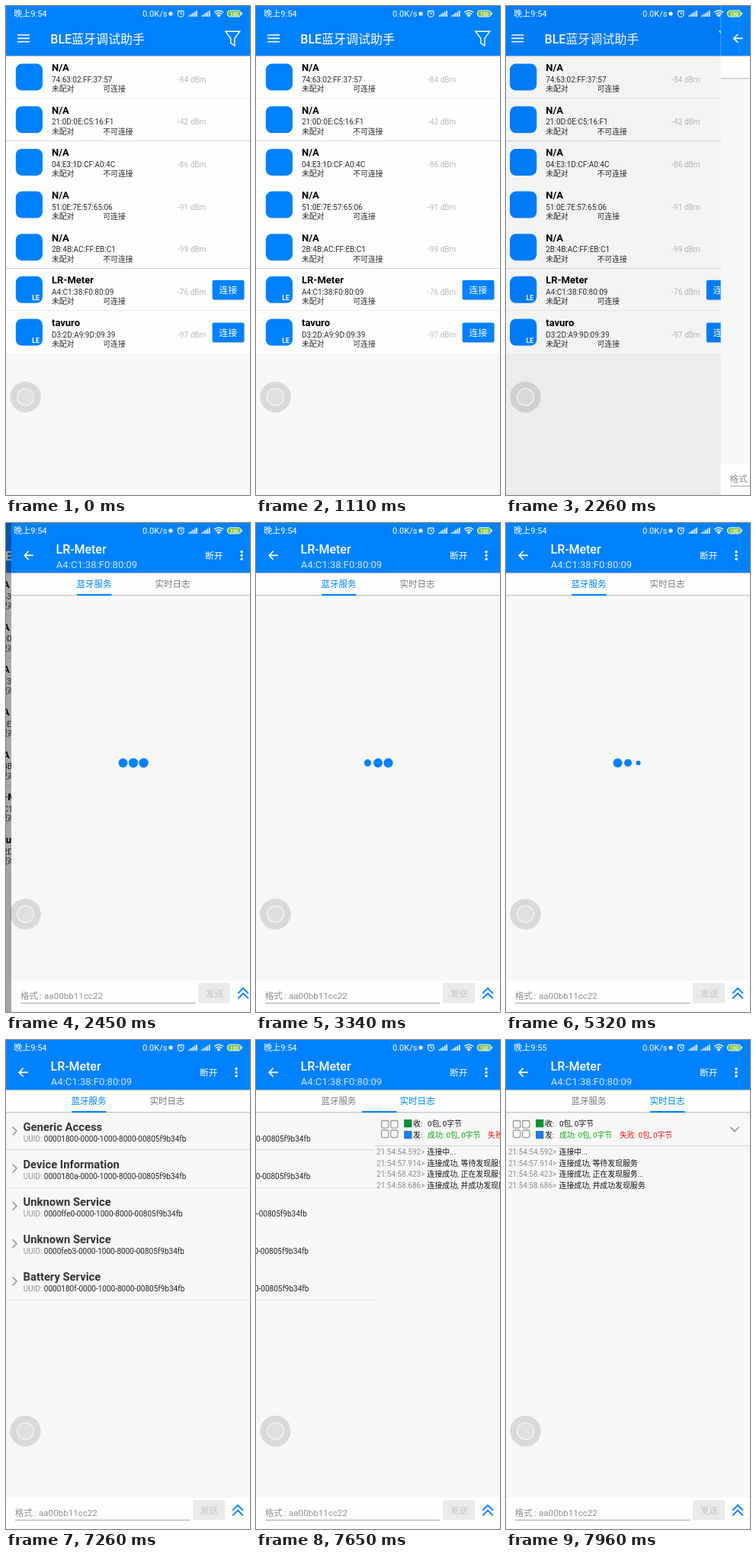
Write an HTML page that moves like this. It is 320x640 px and loops after 8000 ms.

```html
<!DOCTYPE html>
<html lang="zh-CN">
<head>
<meta charset="utf-8">
<title>BLE</title>
<style>
  html, body { margin: 0; width: 100%; height: 100%; overflow: hidden; background: #f6f8f6; }
  svg { display: block; width: 320px; height: 640px; }
  text { font-family: Roboto, "Noto Sans CJK SC", "Noto Sans CJK", sans-serif; white-space: pre; }
  .line { fill: none; stroke-linecap: butt; stroke-linejoin: miter; }
</style>
</head>
<body>
<svg id="stage" viewBox="0 0 320 640" xmlns="http://www.w3.org/2000/svg"></svg>
<script>
const BLUE = '#0081ff', PAPER = '#f6f8f6', WHITE = '#fdfffd';

const rect = (x, y, w, h, fill, extra = '') =>
  `<rect x="${x}" y="${y}" width="${w}" height="${h}" fill="${fill}" ${extra}/>`;
const circle = (x, y, r, fill, extra = '') =>
  `<circle cx="${x}" cy="${y}" r="${r}" fill="${fill}" ${extra}/>`;
const path = (d, stroke, width = 1.6, extra = '') =>
  `<path class="line" d="${d}" stroke="${stroke}" stroke-width="${width}" ${extra}/>`;
const text = (x, y, size, fill, str, weight = 400, extra = '') =>
  `<text x="${x}" y="${y}" font-size="${size}" fill="${fill}" font-weight="${weight}" ${extra}>${str}</text>`;
const group = (id, body, extra = '') => `<g id="${id}" ${extra}>${body}</g>`;
const shadow = y => rect(0, y, 320, 1, '#000', 'opacity=".2"') + rect(0, y + 1, 320, 1, '#000', 'opacity=".07"');

// Scan list
const devices = [
  ['N/A', '74:63:02:FF:37:57', 1, -84],
  ['N/A', '21:0D:0E:C5:16:F1', 0, -42],
  ['N/A', '04:E3:1D:CF:A0:4C', 0, -86],
  ['N/A', '51:0E:7E:57:65:06', 1, -91],
  ['N/A', '2B:4B:AC:FF:EB:C1', 0, -99],
  ['LR-Meter', 'A4:C1:38:F0:80:09', 1, -76, 'LE'],
  ['tavuro', 'D3:2D:A9:9D:09:39', 1, -97, 'LE'],
];
const deviceLines = [.06, .17, 0, 0, .17, .07, 0];

function deviceRow([name, mac, open, rssi, le], i) {
  const y = 65.6 + 55.65 * i;
  let out = rect(12.8, y + 10, 35.2, 35, BLUE, 'rx="8"')
    + text(60, y + 19.3, 13, '#000', name, 700)
    + text(60, y + 34.1, 10, '#2b2b2b', mac)
    + text(60, y + 46.5, 9.8, '#2b2b2b', '未配对')
    + text(127.3, y + 46.5, 9.8, '#2b2b2b', open ? '可连接' : '不可连接')
    + text(225, y + 34.1, 10.1, '#b9bbb9', rssi + ' dBm')
    + rect(0, Math.floor(y + 55), 320, 1, '#000', `opacity="${deviceLines[i]}"`);
  if (le) out += text(34.3, y + 41.5, 8.7, '#fff', le, 700)
    + rect(270.6, y + 16, 41.8, 25.4, '#000', 'rx="2" opacity=".18"')
    + rect(270.6, y + 14.9, 41.8, 25.5, BLUE, 'rx="2"')
    + text(279.6, y + 32, 11.8, '#fff', '连接');
  return out;
}

const scanPage = rect(0, 0, 320, 640, PAPER)
  + rect(0, 65, 320, 390, WHITE)
  + devices.map(deviceRow).join('')
  + circle(291.5, 371.5, 0, '#fff', 'id="ripple" clip-path="url(#button)"')
  + rect(0, 0, 320, 65, BLUE) + shadow(65)
  + path('M15 38H31M15 42.4H31M15 46.8H31', '#fff', 1.6)
  + text(58.3, 49, 16, '#fff', 'BLE蓝牙调试助手', 500)
  + path('M288 33.3H306.6L299.8 42.5V52L294.8 48.6V42.5Z', '#fff', 1.4);

// Device page
const services = [
  ['Generic Access', '1800'],
  ['Device Information', '180a'],
  ['Unknown Service', 'ffe0'],
  ['Unknown Service', 'feb3'],
  ['Battery Service', '180f'],
];
const serviceLines = [.14, .07, 0, .02, .06];

function serviceRow([name, id], i) {
  const y = 94.6 + 49.2 * i;
  return path(`M8.5 ${y + 18.8}L14 ${y + 24.3}L8.5 ${y + 29.8}`, '#8b8d8b', 1.4)
    + text(22.5, y + 24, 14.8, '#333', name, 700)
    + text(22.7, y + 38, 10, '#929492',
        `UUID: <tspan fill="#222">0000${id}-0000-1000-8000-00805f9b34fb</tspan>`)
    + rect(0, Math.round(y + 48.7), 320, 1, '#000', `opacity="${serviceLines[i]}"`);
}

const logs = [
  ['54.592', '连接中...'],
  ['57.914', '连接成功, 等待发现服务'],
  ['58.423', '连接成功, 正在发现服务...'],
  ['58.686', '连接成功, 并成功发现服务'],
];
const logRow = ([time, msg], i) =>
  text(3, 150 + 14.5 * i, 10, '#8b8d8b', `21:54:${time}&gt;`)
  + text(69.5, 150 + 14.5 * i, 9.9, '#111', msg);

const tiles = [[9.5, 105.5], [21.7, 105.5], [9.5, 118], [21.7, 118]]
  .map(([x, y]) => rect(x, y, 9.2, 9.6, 'none', 'rx="1.8" stroke="#999b99" stroke-width="1.3"')).join('');

const logPage = tiles
  + rect(39, 104, 10.3, 10.3, '#0a8f35') + rect(39, 119, 10.3, 10.3, '#1f7ce0')
  + text(51, 113, 9.8, '#111', '收:') + text(70, 113, 9.8, '#111', '0包, 0字节')
  + text(51, 127.8, 9.8, '#111', '发:')
  + text(70, 127.8, 9.8, '#10a010', '成功: 0包, 0字节')
  + text(149, 127.8, 9.8, '#dc1414', '失败: 0包, 0字节')
  + path('M294.3 114L299.9 119.6L305.5 114', '#8b8d8b', 1.5)
  + rect(0, 138, 320, 1, '#d3d5d3')
  + logs.map(logRow).join('');

const dotX = [146.5, 160, 173.5];

const devicePage = rect(0, 0, 320, 640, PAPER)
  + group('services', services.map(serviceRow).join(''))
  + group('log', logPage)
  + group('dots', dotX.map(x => circle(x, 314, 6.2, BLUE)).join(''))
  + rect(0, 65, 320, 29, WHITE) + shadow(94)
  + text(85.5, 84.3, 11.5, BLUE, '蓝牙服务', 400, 'id="tabA"')
  + text(188.5, 84.3, 11.5, '#777', '实时日志', 400, 'id="tabB"')
  + rect(86, 93, 45.5, 2, BLUE, 'id="mark"')
  + rect(0, 0, 320, 65, BLUE) + shadow(65)
  + path('M29 42.4H17.5M22.7 36.8L17.1 42.4L22.7 48', '#fff', 1.6)
  + text(58.5, 40.3, 16, '#fff', 'LR-Meter', 500)
  + text(58.8, 58.6, 13.1, '#cfe6ff', 'A4:C1:38:F0:80:09')
  + text(254, 46.8, 11.7, '#fff', '断开')
  + [37.7, 42.5, 47.3].map(y => circle(302, y, 1.75, '#fff')).join('')
  + rect(0, 599, 320, 41, WHITE)
  + text(11.7, 623, 11.6, '#8f918f', '格式') + text(37, 623, 11.6, '#8f918f', ':')
  + text(43, 623, 11.6, '#8f918f', 'aa00bb11cc22')
  + rect(12, 627.8, 229.5, 1, '#a0a2a0')
  + rect(245, 602, 42, 26.5, '#e9ebe9', 'rx="1.5"')
  + text(254.8, 620, 11.7, '#c3c5c3', '发送')
  + path('M297.2 615.6L304 608.8L310.8 615.6M297.2 622.4L304 615.6L310.8 622.4', BLUE, 2);

// Status bar
const signal = x => [0, 1, 2, 3, 4]
  .map(i => rect(x + i * 2.4, 12 - i * 1.5, 1.5, 2 + i * 1.5, '#fff')).join('');

const statusBar = text(10.3, 14, 11, '#fff', '', 400, 'id="clock"')
  + text(179, 14, 11, '#fff', '0.0K/s')
  + circle(216, 10, 2.6, '#fff')
  + circle(229.3, 10.3, 3.9, 'none', 'stroke="#fff" stroke-width="1.1"')
  + path('M229.3 8V10.5H231.2M224.6 7.6L227 5.4M234 7.6L231.6 5.4', '#fff', 1)
  + signal(239.7) + signal(256.5)
  + path('M273 8.3Q279 3.6 285 8.3M275 10.6Q279 7.4 283 10.6', '#fff', 1.4)
  + path('M276.6 12Q279 10.2 281.4 12L279 14.6Z', '#fff', .5, 'style="fill:#fff"')
  + rect(290.5, 6, 17.5, 8, '#6fbf3a', 'rx="3.6" stroke="#fff" stroke-width="1.1"')
  + rect(308.6, 8.5, 1.2, 3, '#fff')
  + text(293.8, 12.5, 6.6, '#fff', '100', 700);

const touchBall = circle(25.5, 511.8, 20.2, '#000', 'opacity=".12"')
  + circle(25.5, 511.8, 11, 'rgba(255,255,255,.2)', 'stroke="#f4f6f4" stroke-width="1.3"');

document.getElementById('stage').innerHTML =
  `<defs><clipPath id="button">${rect(270.6, 358.8, 41.8, 25.5, '#000', 'rx="2"')}</clipPath></defs>`
  + group('scan', scanPage) + rect(0, 0, 320, 640, '#000', 'id="dim"')
  + group('device', devicePage) + statusBar + touchBall;

const $ = id => document.getElementById(id);
const set = (el, attrs) => { for (const k in attrs) el.setAttribute(k, attrs[k]); };
const move = (id, x) => set($(id), { transform: `translate(${x.toFixed(2)} 0)` });
const show = (id, on) => set($(id), { display: on ? 'inline' : 'none' });
const progress = (t, from, to) => Math.min(1, Math.max(0, (t - from) / (to - from)));

// Critically damped spring for the page change
function spring(t, start, speed) {
  const s = Math.max(0, t - start) * speed;
  return 1 - (1 + s) * Math.exp(-s);
}

function dotScale(t, i) {
  const start = 2388 + 120 * i;
  return t < start ? 1 : .3 + .7 * Math.abs(Math.cos(Math.PI * (t - start) / 750));
}

function render(t) {
  const enter = spring(t, 2239, .027);
  move('scan', -80 * enter ** 1.1);
  move('device', enter > .998 ? 0 : 320 * (1 - enter));
  show('scan', enter < .998);
  show('device', enter > 0);
  set($('dim'), { opacity: enter < .998 ? .35 * enter : 0 });

  const press = progress(t, 2100, 2250);
  set($('ripple'), { r: 24 * press, opacity: .22 * (1 - press) });

  const dotTime = Math.min(t, 6310);
  [...$('dots').children].forEach((dot, i) => set(dot, { r: 6.2 * dotScale(dotTime, i) }));
  show('dots', t < 6470);
  show('services', t >= 6470);

  const u = progress(t, 7350, 7940), swipe = u * u * (3 - 2 * u);
  move('services', -320 * swipe);
  move('log', 320 * (1 - swipe));
  show('log', swipe > 0);
  move('mark', 103 * swipe);
  set($('tabA'), { fill: swipe < .5 ? BLUE : '#777' });
  set($('tabB'), { fill: swipe < .5 ? '#777' : BLUE });

  $('clock').textContent = t < 7784 ? '晚上9:54' : '晚上9:55';
}

const origin = performance.now();
function tick() {
  render((performance.now() - origin) % 8000);
  requestAnimationFrame(tick);
}
tick();
</script>
</body>
</html>
```
